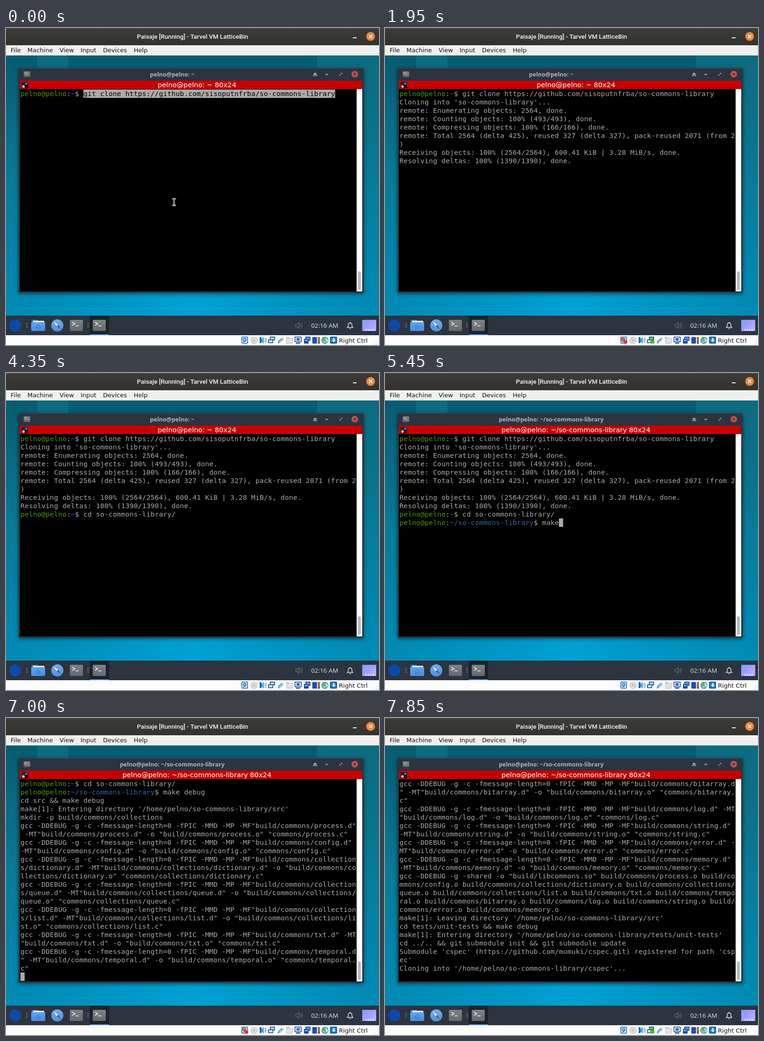
These frames come from a looping animation (800x680 px, 8000 ms). An HTML page with a canvas:

```html
<!DOCTYPE html>
<html lang="en">
<head>
<meta charset="utf-8">
<title>Terminal session</title>
<style>
html, body { margin: 0; width: 800px; height: 680px; overflow: hidden; }
canvas { display: block; }
</style>
</head>
<body>
<canvas id="stage" width="800" height="680"></canvas>
<script>
const LOOP = 8000, COLS = 80, ROWS = 24, CELL_W = 9, CELL_H = 18, LEFT = 31, TOP = 132;
const GREY = '#aaaaaa', GREEN = '#4e9a06', BLUE = '#3465a4';
const USER = 'pelno', HOST = USER + '@' + USER, REPO = 'so-commons-library';
const HOME = '/home/' + USER + '/' + REPO;
const SANS = '"DejaVu Sans", sans-serif';

const canvas = document.getElementById('stage');
let g = canvas.getContext('2d');

// ---- Drawing helpers ----
function box(x, y, w, h, fill, radius = 0) {
  g.fillStyle = fill;
  g.beginPath();
  g.roundRect(x, y, w, h, radius);
  g.fill();
}
function disc(x, y, r, fill) {
  g.fillStyle = fill;
  g.beginPath();
  g.arc(x, y, r, 0, 7);
  g.fill();
}
function path(d, color, width = 0) {
  const p = new Path2D(d);
  if (width) {
    g.strokeStyle = color;
    g.lineWidth = width;
    g.stroke(p);
  } else {
    g.fillStyle = color;
    g.fill(p);
  }
}
function label(text, x, y, font, color, align = 'left') {
  g.font = font;
  g.fillStyle = color;
  g.textAlign = align;
  g.fillText(text, x, y);
}
function gradient(x0, y0, x1, y1, ...colors) {
  const s = g.createLinearGradient(x0, y0, x1, y1);
  colors.forEach((c, i) => s.addColorStop(i / (colors.length - 1), c));
  return s;
}

// ---- Session script: [time, text, color]; \r rewrites the current row ----
const script = [];
const say = (time, text, color = GREY) => script.push([time, text, color]);
function prompt(time, dir) {
  say(time, HOST, GREEN);
  say(time, ':');
  say(time, dir, BLUE);
  say(time, '$ ');
}
function type(text, times) {
  times.forEach((time, i) => say(time, text[i]));
}
function progress(times, name, total, tail) {
  times.forEach((time, i) => {
    const part = (i + 1) / times.length, n = Math.round(total * part);
    const pct = String(Math.round(part * 100)).padStart(3);
    say(time, `\r${name}: ${pct}% (${n}/${total})` + (part === 1 ? tail + ', done.\n' : ''));
  });
}

prompt(0, '~');
say(0, 'git clone https://github.com/sisoputnfrba/' + REPO);
say(150, '\n');
say(950, `Cloning into '${REPO}'...\n`);
say(1600, 'remote: Enumerating objects: 2564, done.\n');
progress([1600, 1650], 'remote: Counting objects', 493, '');
progress([1700, 1750], 'remote: Compressing objects', 166, '');
say(1800, 'remote: Total 2564 (delta 425), reused 327 (delta 327), pack-reused 2071 (from 2)\n');
progress([1800, 1850, 1900], 'Receiving objects', 2564, ', 600.41 KiB | 3.28 MiB/s');
progress([1900, 1950], 'Resolving deltas', 1390, '');
prompt(2000, '~');
type('cd so', [2600, 2850, 2950, 3200, 3350]);
say(3750, '-commons-library/');
say(4400, '\n');
prompt(4400, '~/' + REPO);
type('make debug', [4950, 5050, 5250, 5450, 5600, 5750, 6000, 6200, 6350, 6550]);
say(6850, `\ncd src && make debug\nmake[1]: Entering directory '${HOME}/src'\n`);
say(6850, 'mkdir -p build/commons/collections\n');

const modules = ['process', 'config', 'collections/dictionary', 'collections/queue',
  'collections/list', 'txt', 'temporal', 'bitarray', 'log', 'string', 'error', 'memory']
  .map(name => 'commons/' + name);
modules.forEach((m, i) => say(6850 + 50 * Math.ceil(i / 2),
  `gcc -DDEBUG -g -c -fmessage-length=0 -fPIC -MMD -MP -MF"build/${m}.d" -MT"build/${m}.d"` +
  ` -o "build/${m}.o" "${m}.c"\n`));
say(7200, 'gcc -DDEBUG -g -shared -o "build/libcommons.so" ' +
  modules.map(m => `build/${m}.o`).join(' ') + '\n');
say(7350, `make[1]: Leaving directory '${HOME}/src'\ncd tests/unit-tests && make debug\n`);
say(7400, `make[1]: Entering directory '${HOME}/tests/unit-tests'\n`);
say(7400, 'cd ../.. && git submodule init && git submodule update\n');
say(7750, "Submodule 'cspec' (https://github.com/mumuki/cspec.git) registered for path 'cspec'\n");
say(7800, `Cloning into '${HOME}/cspec'...\n`);

const within = (t, spans) => spans.some(([a, b]) => t >= a && t < b);
const cursorOff = [[0, 150], [750, 950], [1550, 2150], [4350, 4400], [7450, LOOP]];
const netBusy = [[1400, 2000], [7600, LOOP]];
const diskBusy = [[1900, 2150], [6900, 7450]];

function screenRows(t) {
  const rows = [[]];
  for (const [time, text, color] of script) {
    if (time > t) break;
    for (const ch of text) {
      if (ch === '\n') rows.push([]);
      else if (ch === '\r') rows[rows.length - 1] = [];
      else {
        if (rows[rows.length - 1].length === COLS) rows.push([]);
        rows[rows.length - 1].push([ch, color]);
      }
    }
  }
  return rows.slice(-ROWS);
}

function drawTerminal(t) {
  const pasted = t < 150;
  const rows = screenRows(t);
  g.font = '14.67px "DejaVu Sans Mono", monospace';
  g.textAlign = 'left';
  if (pasted) box(LEFT + 15 * CELL_W, TOP, 60 * CELL_W, CELL_H, GREY);
  rows.forEach((row, r) => row.forEach(([ch, color], c) => {
    g.fillStyle = pasted && c >= 15 ? '#000' : color;
    g.fillText(ch, LEFT + c * CELL_W, TOP + r * CELL_H + 14);
  }));
  if (!within(t, cursorOff)) {
    const r = rows.length - 1;
    box(LEFT + rows[r].length * CELL_W, TOP + r * CELL_H, CELL_W, CELL_H, GREY);
  }
  if (pasted) {
    const beam = 'M356.5 366.5h3l1 1l1-1h3M360.5 367v12M356.5 380.5h3l1-1l1 1h3';
    path(beam, '#fff', 3);
    path(beam, '#000', 1);
  }
}

// ---- Desktop ----
function terminalIcon(x, y, w, h) {
  box(x, y, w, h, gradient(0, y, 0, y + h, '#7d8285', '#63686b'), 2);
  const s = w / 28;
  g.save();
  g.translate(x, y);
  g.scale(s, s);
  path('M5 5l6 3.5l-6 3.5M12 13h7', '#f0f0f0', 1.5);
  g.restore();
}

function drawWallpaper() {
  box(0, 59, 800, 558, gradient(0, 59, 0, 617, '#075b70', '#087c9a', '#0089b3'));
  const glow = g.createRadialGradient(400, 610, 0, 400, 610, 430);
  glow.addColorStop(0, 'rgba(0,170,224,.75)');
  glow.addColorStop(1, 'rgba(0,160,210,0)');
  box(0, 59, 800, 558, glow);
  const fade = gradient(0, 59, 0, 330, 'rgba(40,170,190,.2)', 'rgba(40,170,190,0)');
  box(67, 59, 67, 271, fade);
  box(667, 59, 133, 271, fade);
}

function drawWindow() {
  g.save();
  g.shadowColor = 'rgba(0,0,0,.55)';
  g.shadowBlur = 9;
  g.shadowOffsetY = 2;
  box(27, 86, 740, 482, '#2c343f', [3, 3, 0, 0]);
  g.restore();
  box(27, 86, 740, 1, '#3b444f');
  terminalIcon(38, 93, 14, 12);
  path('M658.5 100L663 95.5L667.5 100ZM658.5 101.5h9v1.5h-9Z', '#b4bac2');
  box(685, 98.5, 6, 2, '#a4abb4');
  path('M717.5 96.5h3.5v3.5ZM715 98.5v3.5h3.5Z', '#a4abb4');
  disc(748, 99, 7, '#c75052');
  path('M745.5 96.5l5 5m0-5l-5 5', '#2c343f', 1.5);

  box(30, 113, 734, 18, '#c80000');
  box(34, 116, 13, 13, '#000');
  box(35, 117, 5, 5, '#d01515');
  box(36, 118, 3, 3, '#000');
  box(41, 117, 5, 5, '#207dc4');
  box(35, 123, 5, 5, '#d9d9d0');
  path('M41.5 125h5l-2.5 2.5Z', '#c80000');
  box(30, 131, 722, 434, '#000');
  box(752, 131, 12, 434, '#fff');
  box(755, 522, 6, 40, '#b9b9b9', 3);
}

function drawTaskbar() {
  box(0, 617, 800, 42, '#2b343f');
  disc(20, 638, 13, '#0b4aa6');
  for (const x of [43, 174]) for (const y of [633, 637, 641]) box(x, y, 4, 1, '#8a929b');

  box(55, 626, 14, 8, '#3a78c8', 2);
  box(58, 628, 24, 8, '#eef3fa', 1);
  box(54, 631, 30, 19, gradient(0, 631, 0, 650, '#60a5f0', '#4a8bdc'), 2);
  path('M63.5 641l5.5-5l5.5 5M65.5 640v5h2v-3h3v3h2v-5', '#3977c5', 1);

  disc(110, 638, 13, gradient(0, 625, 0, 651, '#71adee', '#4f8fdf'));
  path('M102 629.5L112 636.5L108.5 640Z', '#f2f2f2');
  path('M118 646.5L108.5 640L112 636.5Z', '#39658f');

  terminalIcon(137, 626, 28, 24);
  box(180, 617, 41, 42, '#1c222a');
  box(180, 657, 41, 2, '#5294e2');
  terminalIcon(186, 626, 28, 24);

  path('M621.5 635.5h3l4-3.5v12l-4-3.5h-3Z', '#68717b', 1.2);
  path('M631 635q2.5 3 0 6M633 632.5q5 5.5 0 11', '#68717b', 1.2);
  label('02:16 AM', 683.5, 643, '13.33px "Noto Sans", sans-serif', '#d3dae3', 'center');
  path('M732 642.5h12l-2-2.5v-3q0-4-4-4.5q-4 .5-4 4.5v3ZM738 632.5v-2', '#e0e4e8', 1.4);
  path('M736 644.5h4l-2 2Z', '#e0e4e8');
  box(764, 626, 30, 24, gradient(764, 626, 785, 650, '#70a5fa', '#9e9cff', '#b2b2ff'));
  for (let x = 771; x < 788; x += 5) path(`M${x} 649v-2l1.5-1.5l1.5 1.5v2Z`, '#e7e5ff');
}

function drawHostBars() {
  box(0, 0, 800, 37, gradient(0, 0, 0, 37, '#3d3c37', '#32322e'));
  box(0, 0, 800, 1, '#55534c');
  label('Paisaje [Running] - Tarvel VM LatticeBin', 400, 23,
    '500 13.4px Roboto, sans-serif', '#f5f4f1', 'center');
  box(744, 20, 8, 2, '#f4f4f4');
  disc(782, 18, 9.5, '#ef8437');
  path('M778.5 14.5l7 7m0-7l-7 7', '#fff', 2);

  box(0, 37, 800, 22, '#eff0ee');
  box(0, 58, 800, 1, '#dcdddc');
  const menu = { File: 10, Machine: 46, View: 115, Input: 160, Devices: 208, Help: 274 };
  for (const name in menu) label(name, menu[name], 52, '13px ' + SANS, '#111');

  box(0, 659, 800, 21, '#fdfdfd');
  label('Right Ctrl', 714, 675, '13px ' + SANS, '#111');
  for (let i = 0; i < 4; i++)
    for (let j = 0; j <= i; j++) box(797 - 3 * j, 669 + 3 * i, 1, 1, '#b5b5b5');
}

function screenIcon(x, y, w, h, fill) {
  box(x, y, w, h, '#163f86', 1);
  box(x + 1.5, y + 1.5, w - 3, h - 3, fill);
}

function drawIndicators(t) {
  box(505, 662, 14, 15, '#1c63b8', 2);
  box(506.5, 663.5, 11, 12, '#d4eafb', 1);
  disc(512, 668.5, 3.6, '#1d6fc6');
  disc(512, 668.5, 1.6, '#fff');
  path('M509 674l5-3', '#174f98', 1.4);
  if (within(t, diskBusy)) {
    disc(510, 668, 4, '#ef5a2a');
    disc(516, 674, 3.5, '#e32a1c');
  }

  disc(532, 670, 7.5, '#b4b4b4');
  disc(532, 670, 6.5, '#dedede');
  disc(532, 670, 2.2, '#a6a6a6');
  disc(532, 670, 1, '#fff');

  box(544, 663, 4, 13, '#1d67b8', 1);
  path('M548 667l5-4v14l-5-4Z', '#4ba5e3');
  path('M555 666q2 4 0 8M557 664q3 6 0 12', '#2b78c4', 1);

  const net = within(t, netBusy);
  screenIcon(566, 662, 11, 8, net ? '#66cc3b' : '#a8d6f5');
  screenIcon(562, 668, 11, 8, net ? '#d8eed0' : '#d1eafa');
  if (net) box(569, 670, 9, 7, '#55b72d', 2);

  path('M583 677l1-5l8-8l4 3l-8 8Z', '#2b86c8');
  path('M585 674l7-8l2 1.5l-7 8Z', '#a9dcf5');
  path('M591 665l2-3l4 3l-2 3Z', '#dcecf5');

  box(601, 663, 6, 4, '#b9b9b9', 1);
  box(601, 665, 14, 12, '#bdbdbd', 1);
  box(602, 666, 12, 10, '#e2e2e2');

  screenIcon(619, 662, 15, 12, '#f2f8ff');
  box(623, 665, 7, 6, '#2f76ca');
  box(622, 675, 9, 2, '#163f86');

  screenIcon(642, 662, 11, 9, '#5d9ee2');
  box(639, 667, 10, 10, '#1b4c9d', 1);
  box(641, 669, 6, 3, '#78b0ea');

  box(657, 663, 10, 14, '#254cae', 1);
  box(669, 663, 4, 14, '#222');
  box(670, 664, 2, 12, gradient(0, 664, 0, 676, '#e0c53a', '#d8641b'));

  disc(684, 670, 7.5, '#2474b9');
  disc(684, 670, 6.3, '#78c8ed');
  path('M679 666l5-2l3 4l-4 4l-4-1ZM685 672l4 1l-3 3Z', '#63b734');
  path('M685 666l5 5l-2 .5l1 3', '#fff', 1.2);

  box(695, 662, 15, 15, '#174f98', 2);
  box(696.5, 663.5, 12, 12, '#1b7fbc', 1);
  path('M701.5 665h3v4h3l-4.5 5l-4.5-5h3Z', '#e4f6ff');
}

// The fixed scenery is painted once.
const scenery = document.createElement('canvas');
scenery.width = 800;
scenery.height = 680;
const stage = g;
g = scenery.getContext('2d');
drawWallpaper();
drawWindow();
drawTaskbar();
drawHostBars();
g = stage;

const start = performance.now();
function render(now) {
  const t = Math.max(0, now - start) % LOOP;
  const title = HOST + ': ~' + (t >= 4450 ? '/' + REPO : '');
  g.drawImage(scenery, 0, 0);
  label(title, 356.5, 104, 'bold 12.5px "Noto Sans", sans-serif', '#adb4bd', 'center');
  label(title + ' 80x24', 409.5, 127, '14.67px ' + SANS, '#fff', 'center');
  drawTerminal(t);
  drawIndicators(t);
  requestAnimationFrame(render);
}
render(start);
</script>
</body>
</html>
```
